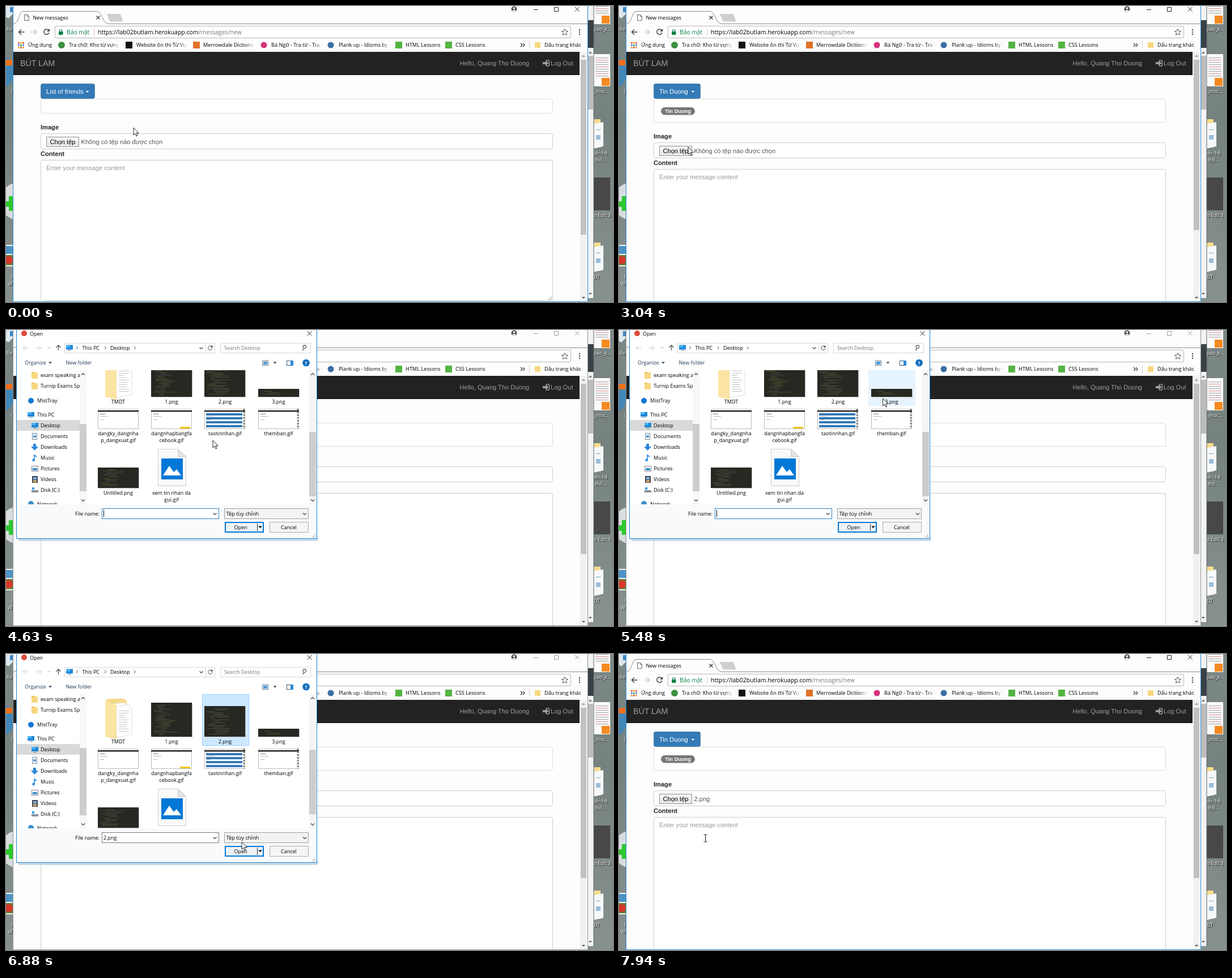
Write an HTML page that moves like this. It is 1071 px wide and 523 px high and loops after 8 s.

```html
<!DOCTYPE html>
<html lang="vi">
<head>
<meta charset="utf-8">
<title>New messages</title>
<style>
html, body { margin: 0; width: 100%; height: 100%; overflow: hidden; background: #fff; }
svg { display: block; }
text { font: 9px "Open Sans", "Noto Sans", sans-serif; fill: #000; }
.page text { font: 11.1px "Liberation Sans", Arial, sans-serif; fill: #333; }
.page .bold { font-weight: bold; fill: #222; }
.mark { font-size: 9.2px; }
.desk { fill: #fff; font-size: 8.6px; text-shadow: 1px 1px 1px #000; }
.mid { text-anchor: middle; }
</style>
</head>
<body>
<svg id="stage" width="1071" height="523" viewBox="0 0 1071 523"></svg>
<script>
const rect = (x, y, w, h, fill, more = '') =>
  `<rect x="${x}" y="${y}" width="${w}" height="${h}" fill="${fill}" ${more}/>`;
const box = (x, y, w, h, fill, line, more = '') =>
  rect(x + .5, y + .5, w - 1, h - 1, fill, `stroke="${line}" ${more}`);
const text = (x, y, s, more = '') => `<text x="${x}" y="${y}" ${more}>${s}</text>`;
const path = (d, fill, more = '') => `<path d="${d}" fill="${fill}" ${more}/>`;
const line = (d, color, w = 1, more = '') => path(d, 'none', `stroke="${color}" stroke-width="${w}" ${more}`);
const dot = (x, y, r, fill, more = '') => `<circle cx="${x}" cy="${y}" r="${r}" fill="${fill}" ${more}/>`;
const group = (id, s, more = '') => `<g id="${id}" ${more}>${s}</g>`;
// Nested svg: clips to a box but keeps stage coordinates.
const clip = (x, y, w, h, s) =>
  `<svg x="${x}" y="${y}" width="${w}" height="${h}" viewBox="${x} ${y} ${w} ${h}">${s}</svg>`;
const down = (x, y, r, fill) => path(`M${x - r},${y}h${2 * r}l${-r},${r}z`, fill);
const chevron = (x, y, r, dir, color = '#444') => line(`M${x - r},${y - dir * r / 2}l${r},${dir * r}l${r},${-dir * r}`, color, 1.2);

let seed = 7;
const rnd = () => (seed = seed * 16807 % 2147483647) / 2147483647;

function papers(x, y, ink) {
  let s = path(`M${x},${y}l6,-4h28l4,4v54l-38,8z`, '#f5d98a') +
    path(`M${x + 12},${y + 5}l24,-2v56l-24,5z`, '#fff', 'stroke="#ddd" stroke-width=".6"') +
    path(`M${x + 20},${y + 10}l20,-4l7,7v46l-27,6z`, '#fff', 'stroke="#ccc" stroke-width=".6"');
  for (let i = 0; i < 10; i++) s += rect(x + 24, y + 17 + i * 4, 8 + rnd() * 11, 1, ink, 'opacity=".5"');
  return s + path(`M${x},${y}l20,7v61l-20,-5z`, '#fbe4a4');
}

function codeShot(x, y, w, h) {
  const inks = ['#87825f', '#7f8d47', '#a39c60', '#777'];
  let s = rect(x + 1, y + 1, w, h, '#bbb') + rect(x, y, w, h, '#272822');
  for (let v = 4; v < h - 3; v += 2.5) {
    const a = 4 + rnd() * 16;
    s += rect(x + a, y + v, 5 + rnd() * (w - a - 30), .8, inks[rnd() * 4 | 0], 'opacity=".5"');
  }
  return s;
}

function webShot(x, y, kind) {
  let s = box(x, y, 72, 36, '#fff', '#bbb') + rect(x, y, 72, 2, '#ddd') + rect(x, y + 3, 72, 2.5, '#222') +
    rect(x + 4, y + 9, 9, 1, '#777') + rect(x + 4, y + 13, 14, 1, '#bbb') + rect(x + 4, y + 19, 7, 1, '#bbb');
  if (kind === 'rows') for (let i = 0; i < 4; i++) s += rect(x + 3, y + 8 + i * 7, 64, 4, '#337ab7');
  if (kind === 'badge') s += rect(x + 51, y + 32, 18, 3, '#f5c518');
  if (kind === 'rows' || kind === 'edge') s += line(`M${x + 70},${y}v36`, '#7f8a80', 3, 'stroke-dasharray="3 2"');
  return s;
}

const monitor = (x, y) => rect(x, y, 12, 8, '#1e88d8') + rect(x, y, 7, 4, '#4fb4f4') + rect(x + 3, y + 9, 6, 1, '#678');

/* ---- desktop ---- */
function sheet(y, h) {
  let s = rect(1037, y, 29, h, '#fbfbfb');
  for (let v = 6; v < h - 18; v += 4) s += rect(1040, y + v, 23, 1.2, v % 12 < 8 ? '#aaa' : '#d99');
  return s + rect(1051, y + h - 15, 14, 14, '#f58a1f');
}
const label = (x, y, s) => text(x, y, s, 'class="desk"');
const desktop = rect(0, 0, 1071, 523, 'url(#wall)') +
  path('M0,0h12v14l-8,8l-4,-3z', '#dfe8ee') + rect(7, 2, 5, 9, '#3f87c5') + label(1, 44, 'Re') +
  dot(-18, 117, 32, '#4187b8') + rect(0, 95, 11, 10, '#f0701c') +
  dot(22, 345, 33, '#d9dcdf') + path('M0,345h5v-9h7v26h-7v-7h-5z', '#2ec82e') +
  rect(0, 422, 12, 38, '#f4f4f4') + rect(0, 424, 12, 14, '#4d93c4') + rect(0, 440, 12, 18, '#6b7a35') + dot(5, 449, 7, '#d8382b') +
  label(9, 154, '(') + label(9, 482, 'I') + label(3, 494, 'W') +
  sheet(-30, 62) + sheet(85, 57) +
  [200, 418].map(y => rect(1037, y, 12, 50, '#f7dc8d') + path(`M1037,${y + 8}l17,-3v43l-17,4z`, '#f6f8fa') +
    rect(1041, y + 18, 8, 1, '#7aa') + rect(1041, y + 28, 8, 8, '#9bbdd9')).join('') +
  rect(1036, 303, 30, 58, '#484848') +
  label(1037, 44, 'pao_k...') + label(1037, 154, '_moc...') + label(1037, 263, 'iến hệ') +
  label(1039, 275, 'thố...') + label(1037, 373, 'o Edit 3') + label(1037, 482, 'DT') +
  rect(1026, 0, 11, 516, '#f3f3f3') + rect(1026, 25, 11, 49, '#3a4145') + rect(1027, 88, 9, 95, '#bdbdbd') +
  path('M1028,84l3,-4l3,4z', '#777') + down(1031, 507, 3, '#555') + rect(1036.5, 0, 1, 516, '#5c6668');

/* ---- browser ---- */
const mark = (x, s, w, icon) => icon + clip(x, 58, w, 22, text(x, 72.3, s, 'class="mark"')) +
  rect(x + w - 14, 60, 14, 18, 'url(#fade)');
const sq = (x, color) => rect(x, 63, 12, 12, color);
let apps = '';
for (let i = 0; i < 9; i++) {
  const col = i % 3, row = i / 3 | 0;
  apps += rect(21 + col * 4, 64 + row * 4, 2.8, 2.8, ['#e44d3a', '#34a853', '#f3a921', '#4285f4'][(i * 2 + row) % 4]);
}

const browser = rect(12, 0, 1015, 523, '#fdfdfd') +
  line('M13,31.5C24,31 22,9.5 30,9.5H160C171,9.5 169,31 181,31.5H1026', '#8b8b8b') +
  path('M178,14h21q3,0 4,3l3,9q0,1.5 -2,1.5h-18q-3,0 -4,-3z', '#cfcfcf') +
  line('M32.5,15.5h5l3,3v7h-8zM37.5,15.5v3h3', '#666') + text(47.5, 23.8, 'New messages') +
  line('M159.5,17.5l6,6m0,-6l-6,6', '#333', 1.3) +
  dot(896.5, 5.5, 5, '#555') + dot(896.5, 4, 1.8, '#fdfdfd') + path('M893,8.5q3.5,-3 7,0q-3.5,3 -7,0z', '#fdfdfd') +
  group('controls', line('M931,6.5h8M967.5,2.5h7v7h-7zM1004,2l7.5,7.5m0,-7.5l-7.5,7.5', 'currentColor')) +
  line('M32.5,46h-10m4.5,-4.5l-4.5,4.5l4.5,4.5', '#444', 1.5) +
  line('M44,46h10m-4.5,-4.5l4.5,4.5l-4.5,4.5', '#ccc', 1.5) +
  line('M75,42.5a4.7,4.7 0 1 0 1,4.5', '#444', 1.5) + path('M77,40v5h-5z', '#444') +
  box(86, 35, 911, 22, '#fff', '#b5b5b5', 'rx="2"') +
  rect(93, 45, 7.5, 6, '#0b8043', 'rx="1"') + line('M94.7,45v-1.5a2,2 0 0 1 4,0v1.5', '#0b8043', 1.2) +
  text(107, 49.8, 'Bảo mật', 'style="font-size:10.3px;fill:#0b8043"') + rect(155, 40, 1, 12, '#ccc') +
  text(162, 49.8, 'https://lab02butlam.herokuapp.com<tspan fill="#777">/messages/new</tspan>', 'style="font-size:10.5px"') +
  path('M986,40.5l1.6,3.8l4,.3l-3.1,2.7l1,4l-3.5,-2.2l-3.5,2.2l1,-4l-3.1,-2.7l4,-.3z', 'none', 'stroke="#555"') +
  [42, 46, 50].map(y => dot(1012, y, 1.2, '#444')).join('') +
  apps + text(39, 72.3, 'Ứng dụng', 'class="mark"') +
  mark(111, 'Tra chữ: Kho từ vựng số hóa', 89, dot(98, 69, 6, '#3d9140')) +
  mark(230, 'Website ôn thi Từ Vựng', 90, sq(211, '#111')) +
  mark(348, 'Merrowdale Dictionary', 90, sq(330, '#e0712a')) +
  mark(468, 'Bá Ngữ - Tra từ - Tra từ', 90, dot(455, 69, 5.5, '#d8337c')) +
  mark(587, 'Plank up - Idioms by verbs', 90, dot(573, 69, 5.5, '#3b6ea5')) +
  mark(705, 'HTML Lessons', 76, sq(687, '#54b443')) +
  mark(793, 'CSS Lessons', 76, sq(775, '#54b443')) +
  line('M908,66l3,3l-3,3m4,-6l3,3l-3,3', '#333', 1.2) + rect(923, 62, 1, 14, '#ccc') +
  rect(933, 64, 10, 10, '#f7d77e', 'rx="1"') + text(950, 72.3, 'Dấu trang khác', 'class="mark"');

const button = (id, w, s) => group(id,
  rect(61.5, 137.5, w - 1, 26, 'currentColor', 'rx="3" stroke="#245580" stroke-opacity=".5"') +
  text(71, 155, s, 'style="fill:#fff"') + down(61 + w - 13.5, 150, 3, '#fff'));
const friends = ['Mien Tho', 'Tin Duong', 'Tuan Manh', 'Thu Quynh'];

const page = rect(13, 81, 999, 40, '#222') + rect(13, 121, 999, 1, '#101010') +
  text(25, 105.5, 'BÚT LAM', 'style="font-size:14.2px;fill:#9d9d9d"') +
  text(923, 105, 'Hello, Quang Tho Duong', 'style="fill:#9d9d9d;text-anchor:end"') +
  path('M947,99h5v-3l5.5,5l-5.5,5v-3h-5z', '#9d9d9d') + line('M953,96h3.5q2,0 2,2v6q0,2 -2,2h-3.5', '#9d9d9d', 1.5) +
  text(961, 105, 'Log Out', 'style="fill:#9d9d9d"') +
  button('pick', 96, 'List of friends') + button('chosen', 83, friends[1]) +
  '<rect id="tags" x="61.5" y="164.5" width="903" rx="3" fill="#fff" stroke="#ddd"/>' +
  group('tag', rect(74, 179, 60, 13.5, '#777', 'rx="6.7"') +
    text(104, 189, friends[1], 'class="mid" style="font-size:9.4px;font-weight:bold;fill:#fff"')) +
  group('form',
    text(61, 217.5, 'Image', 'class="bold"') + box(61, 225, 904, 28, '#fff', '#ccc', 'rx="3"') +
    box(71, 231, 58, 18, '#e9e9e9', '#8f8f8f') + rect(72, 232, 56, 8, '#f3f3f3') +
    text(100, 244, 'Chọn tệp', 'class="mid" style="fill:#000"') +
    '<text id="upload" x="132.5" y="244" style="fill:#555"></text>' +
    text(61, 264.5, 'Content', 'class="bold"') + box(61, 272, 904, 249, '#fff', '#ccc', 'rx="3"') +
    text(71, 290, 'Enter your message content', 'style="fill:#999"') +
    line('M957,519.5l6,-6m-2.5,6l2.5,-2.5', '#888')) +
  rect(1013, 81, 12, 441, '#f1f1f1') + '<rect id="thumb" x="1014" y="95" width="10" fill="#c1c1c1"/>' +
  path('M1016,90l3,-4l3,4z', '#a3a3a3') + down(1019, 514, 3, '#505050') +
  group('menu', rect(61, 168, 128, 93, '#000', 'opacity=".1" rx="4"') + box(61, 166, 127, 92, '#fff', '#bbb', 'rx="3"') +
    '<rect id="hover" x="62" y="191" width="125" height="21" fill="#f5f5f5"/>' +
    friends.map((f, i) => text(77, 185 + i * 20.6, f)).join(''));

/* ---- file dialog ---- */
const side = (y, s, icon, x = 61) => icon + text(x, y + 3.3, s);
const folder = y => rect(45, y - 5, 11, 11, '#f7d77e') + rect(45, y - 6, 5, 2, '#e9be55');
const sidebar = clip(19, 71, 111, 237,
  rect(19, 159, 111, 19, '#d9d9d9') +
  side(80, 'exam speaking a', folder(80)) + side(99, 'Turnip Exams Sp', folder(99)) +
  side(125, 'MistTray', dot(44, 125, 5, '#1277d3'), 55) + side(150, 'This PC', monitor(38, 145), 55) +
  side(169, 'Desktop', monitor(45, 164)) +
  side(188, 'Documents', box(46, 182, 9, 12, '#fff', '#789') + rect(48, 186, 5, 4, '#5b9bd5')) +
  side(207, 'Downloads', path('M48,201h5v5h4l-6.5,7l-6.5,-7h4z', '#2b88d9')) +
  side(226, 'Music', line('M50,230v-9l4,3', '#1e88e5', 1.6) + dot(48.5, 230, 2.2, '#1e88e5')) +
  side(245, 'Pictures', box(45, 240, 12, 10, '#fff', '#889') + rect(47, 244, 8, 4, '#3c8ec7')) +
  side(264, 'Videos', rect(46, 258, 10, 12, '#445') + rect(48, 260, 6, 4, '#7fb2e5') + rect(48, 265, 6, 4, '#c9a86a')) +
  side(283, 'Disk (C:)', rect(45, 283, 12, 4, '#8a9199') + rect(46, 278, 4, 4, '#2b9fe6')) +
  side(307.5, 'Network', dot(44, 307, 5, '#3d8fc9'), 55) +
  group('twigs', line('M26.5,148l2.5,3l2.5,-3M34,242l3,3l-3,3', '#888')));

const cap = (x, y, ...rows) => rows.map((r, i) => text(x, y + 3.3 + i * 12, r, 'class="mid"')).join('');
const tile = (id, x) => `<rect id="${id}" x="${x + .5}" y="71.5" width="82" height="90" fill="#e5f3ff" stroke="#e5f3ff"/>`;
const topRows =
  papers(175, 86, '#666') + path('M181,91l14,-4l3,20l6,14l-4,26l-12,-4z', '#3b3230') + rect(187, 118, 9, 18, '#8a4a33') + cap(198, 160, 'Biểu diễn thông', 'tin') +
  dot(293, 116, 33, 'url(#sea)') + path('M288,88q18,-6 28,8l-6,14l-14,-4l-8,6zM272,122l20,4l-2,16l-10,-3zM308,118l14,-4l-6,20z', '#bcd8e4') +
  path('M254,94h16v-14l19,19l-19,18v-13h-16z', '#e8651c') + cap(292, 160, 'English') +
  path('M399,88l4,18l19,-3l-16,16l10,24l-21,-12l-24,14l8,-23l-14,-18l22,2z', '#36a3f0', 'stroke="#6fbff7"') + cap(386, 160, 'Games') +
  dot(481, 115, 33.5, '#d4d7db', 'stroke="#bbb"') + path('M481,115l-22,-25a33,33 0 0 1 24,-8zM481,115l20,26a33,33 0 0 1 -20,7z', '#f0f2f4') +
  dot(481, 115, 9, '#fff', 'stroke="#aaa"') + path('M453,119h11v11h12v11h-12v12h-11v-12h-11v-11h11z', '#2fc82f') +
  dot(497, 116, 6, '#1e88e5') + path('M499,78h4q2,12 13,16q2,8 -3,14q-1,-10 -10,-13v21h-4z', '#1e88e5') + cap(481, 160, 'Music') +
  papers(175, 194, '#48a') + rect(199, 220, 14, 16, '#8fb8dd') + cap(197, 264, 'Phát triển hệ', 'thống thông tin', 'hiện đại') +
  rect(259, 194, 33, 24, '#7fb9e4') + rect(259, 209, 33, 9, '#2d6f94') + rect(293, 194, 32, 24, '#b9d36a') +
  path('M297,215l8,-18l9,18z', '#d59a2f') + dot(317, 209, 6, '#3f8fcf') + rect(259, 220, 33, 25, '#7d6a2c') + dot(275, 232, 12, '#d9261c') + dot(274, 232, 4, '#f2c12e') +
  rect(293, 220, 32, 25, '#2b87c9') + path('M301,228q8,-12 16,0l-6,12h-4z', '#e0a21b') + cap(292, 264, 'Photos,', 'Wallpapers') +
  path('M370,190l49,12v38l-49,-10z', '#333') + path('M372,193l45,11v33l-45,-9z', '#2b97e8') + path('M372,193l45,11l-45,20z', '#61b8f5') +
  path('M393,236l14,3l4,8l-18,-4z', '#8a8f94') + path('M356,240l12,-6l32,10l-14,8z', '#c9ced2', 'stroke="#888" stroke-width=".6"') + cap(386, 264, 'Softwares') +
  path('M478,189l29,27h-15q0,22 18,34q-37,-3 -41,-34h-17z', '#2fc82f') + cap(481, 264, 'Studying');

const lastRows = tile('tile2', 346) + tile('tile3', 440) +
  papers(175, 83, '#888') + cap(198, 155, 'TMDT') +
  codeShot(256, 86, 72, 60) + cap(292, 155, '1.png') + codeShot(350, 92, 72, 54) + cap(386.5, 155, '2.png') +
  codeShot(445, 132, 72, 14) + cap(481, 155, '3.png') +
  webShot(162, 167) + cap(198, 211, 'dangky_dangnha', 'p_dangxuat.gif') +
  webShot(256, 167, 'badge') + cap(292, 211, 'dangnhapbangfa', 'cebook.gif') +
  webShot(350, 167, 'rows') + cap(386.5, 211, 'taotinnhan.gif') +
  webShot(445, 167, 'edge') + cap(481, 211, 'themban.gif') +
  codeShot(162, 271, 72, 36) + cap(198, 316, 'Untitled.png') +
  path('M268.5,238.5h35l14,13v52h-49z', '#fafafa', 'stroke="#ccc"') + path('M303.5,238.5v13h14z', '#e4e4e4', 'stroke="#ccc"') +
  rect(274, 255, 38, 37, '#0078d7') + path('M277,285l11,-17l8,11l5,-5l8,11z', '#fff') + cap(292, 316, 'xem tin nhan da', 'gui.gif');

const ink = 'style="fill:#1e395b"';
const dialog = rect(21, 365, 530, 8, '#bfd2de', 'rx="4" opacity=".8"') + box(18, -2, 531, 371, '#fff', 'currentColor') +
  rect(19, 308, 529, 60, '#f9fafb') +
  dot(32, 6, 5, '#dd4b39') + text(42, 9.5, 'Open') + line('M531.5,2l8,8m0,-8l-8,8', '#222') +
  group('bars', line('M39,31.5h-9m4,-4l-4,4l4,4M53,31.5h9m-4,-4l4,4l-4,4', '#c8c8c8') + chevron(76, 31, 2.5, 1, '#ccc') +
    box(103, 23, 266, 18, 'none', '#d9d9d9') + rect(352, 23, 1, 18, '#d9d9d9') + box(378, 23, 160, 18, 'none', '#d9d9d9') +
    line('M226,29l2.5,2.5l-2.5,2.5', '#444')) +
  line('M92.5,36v-9m-4,4l4,-4l4,4', '#555', 1.3) + monitor(106, 26.5) +
  line('M124,29l2.5,2.5l-2.5,2.5M174,29l2.5,2.5l-2.5,2.5', '#444') + text(134.5, 34.5, 'This PC') + text(184, 34.5, 'Desktop') +
  chevron(344.5, 32, 3, 1) + line('M363,29a3.7,3.7 0 1 0 1,3.5', '#444') + path('M364.5,27v4h-4z', '#444') +
  text(385, 34.8, 'Search Desktop', 'style="fill:#777;font-size:8.8px"') + line('M523,36l3,-3m.5,-.5a2.8,2.8 0 1 1 3,-3a2.8,2.8 0 0 1 -3,3', '#555', 1.2) +
  text(33, 61.3, 'Organize', ink) + down(78, 56.5, 3, '#1e395b') + text(105.5, 61.3, 'New folder', ink) +
  box(452, 54, 11, 9, '#fff', '#678') + rect(454, 56, 7, 5, '#4f9bd8') + down(474.5, 56.5, 3, '#333') +
  box(495, 54, 12, 9, '#fff', '#357') + rect(502, 54, 5, 9, '#2b88d9') +
  dot(529.5, 58, 6.3, '#0f6cbd') + text(529.5, 61.5, '?', 'class="mid" style="fill:#fff;font-weight:bold"') +
  sidebar + rect(130, 71, 12, 237, '#f7f7f7') + rect(130, 166, 12, 119, '#cdcdcd') + chevron(136, 78, 3, -1) + chevron(136, 301, 3, 1) +
  clip(150, 71, 385, 237, group('list', topRows + group('last', lastRows, 'transform="translate(0 224)"'))) +
  rect(535, 71, 12, 237, '#f5f5f5') + '<rect id="bar" x="535" width="12" fill="#cdcdcd"/>' + chevron(541, 78, 3, -1) + chevron(541, 301, 3, 1) +
  text(165, 327.8, 'File name:', 'text-anchor="end"') +
  '<rect id="field" x="169.5" y="315.5" width="206" height="18" fill="#fff"/><text id="name" x="172" y="328"></text>' +
  '<rect id="caret" x="172" y="318" width="1" height="12"/>' + chevron(368.5, 325, 3, 1) +
  box(385, 315, 149, 19, '#f3f3f3', '#a0a0a0') + text(388.5, 327.8, 'Tệp tùy chỉnh', 'style="font-size:9.3px"') + chevron(527, 325, 3, 1) +
  rect(387, 340, 67, 17, '#eef2f5', 'stroke="#0078d7" stroke-width="2"') + rect(443, 342, 1, 13, '#333') + down(448.5, 346.5, 3.5, '#111') +
  text(414, 351.5, 'Open', 'class="mid"') + box(465, 339, 69, 19, '#f5f5f5', '#adadad') + text(499, 351.5, 'Cancel', 'class="mid"') +
  line('M540,366.5l6,-6m-3,6l3,-3', '#aaa', 1.2, 'stroke-dasharray="1.5 1"');

const defs = `<defs>
<linearGradient id="wall" x2="0" y2="1"><stop stop-color="#7c8886"/><stop offset=".4" stop-color="#76827f"/>
<stop offset="1" stop-color="#87928f"/></linearGradient>
<linearGradient id="fade"><stop stop-color="#fdfdfd" stop-opacity="0"/><stop offset="1" stop-color="#fdfdfd"/></linearGradient>
<radialGradient id="sea" cx=".4" cy=".35"><stop stop-color="#8cc4e6"/><stop offset="1" stop-color="#3579b3"/></radialGradient></defs>`;

document.getElementById('stage').innerHTML = defs + desktop + browser + `<g class="page">${page}</g>` +
  group('frame', line('M12.5,0V522.5H1026.5V0', 'currentColor')) + group('dialog', dialog) +
  group('arrow', path('M0,0V13L3,10.3L5.2,15L7.2,14.1L5,9.5H9.2Z', '#fff', 'stroke="#111" stroke-width=".9"')) +
  group('beam', line('M-3,-6.5h2q1,0 1,1q0,-1 1,-1h2M0,-5.5v11M-3,6.5h2q1,0 1,-1q0,1 1,1h2', '#111'));

/* ---- motion ---- */
const $ = id => document.getElementById(id);
const set = (id, k, v) => $(id).setAttribute(k, v);
const show = (id, on) => set(id, 'display', on ? 'inline' : 'none');

// Screen updates come in bursts: start, end, count.
const bursts = [[120, 730, 5], [1000, 1550, 5], [1830, 2760, 8], [2890, 3830, 7],
  [3980, 4900, 8], [5060, 6050, 8], [6180, 7130, 8], [7280, 7940, 6]];
const ticks = bursts.flatMap(([a, b, n]) => Array.from({ length: n }, (_, i) => a + (b - a) * i / (n - 1)));
const snap = t => ticks.reduce((last, u) => u <= t ? u : last, 0);

// Pointer stops: time, x, y.
const route = [[0, 225, 215], [425, 121, 150], [870, 121, 150], [1500, 121, 197], [1960, 121, 197], [2700, 122, 249],
  [3980, 122, 249], [4300, 365, 195], [4930, 365, 195], [5450, 478, 112], [5760, 383, 117], [6316, 383, 117],
  [6850, 416, 332], [7100, 418, 346], [7290, 418, 346], [7800, 152.5, 325.5]];

function pointer(t) {
  const i = route.findIndex(k => k[0] > t);
  if (i < 0) return route[route.length - 1].slice(1);
  const [a, b] = [route[i - 1], route[i]];
  const u = (t - a[0]) / (b[0] - a[0]), e = u * u * (3 - 2 * u);
  return [a[1] + (b[1] - a[1]) * e, a[2] + (b[2] - a[2]) * e];
}

function draw(time) {
  const t = snap(time), within = (a, b) => t >= a && t < b;
  const [x, y] = pointer(t);
  const picked = t >= 1950, idle = within(3200, 7400), beam = t >= 7500;

  show('pick', !picked);
  show('chosen', picked);
  show('tag', picked);
  show('menu', within(570, 1950));
  show('hover', y > 185);
  set('pick', 'color', t >= 420 ? '#286090' : '#337ab7');
  set('chosen', 'color', '#337ab7');
  set('tags', 'height', picked ? 41 : 25);
  set('form', 'transform', `translate(0 ${picked ? 16 : 0})`);
  set('thumb', 'height', picked ? 301 : 309);
  $('upload').textContent = t >= 7400 ? '2.png' : 'Không có tệp nào được chọn';
  set('controls', 'color', idle ? '#999' : '#222');
  set('frame', 'color', idle ? '#8f9698' : '#2a8ad4');

  const ready = t >= 3670, k = ready ? 1 : t >= 3500 ? .9965 : .96;
  show('dialog', within(3350, 7400));
  set('dialog', 'opacity', t < 3500 ? .5 : 1);
  set('dialog', 'color', ready ? '#1883d7' : '#7d9bb0');
  set('dialog', 'transform', `translate(${283.5 * (1 - k)} ${184 * (1 - k)}) scale(${k})`);
  show('bars', ready);
  show('twigs', t < 4200);

  const scroll = t >= 6400 ? 224 : 252 * Math.min(1, Math.max(0, (t - 4111) / 394));
  set('list', 'transform', `translate(0 ${-scroll})`);
  set('bar', 'y', 84 + 96 * scroll / 252);
  set('bar', 'height', ready ? 114 : 89);

  const chosen = t >= 5880;
  show('tile2', t >= 5600);
  show('tile3', within(5300, 5600));
  set('tile2', 'fill', chosen ? '#cce8ff' : '#e5f3ff');
  set('tile2', 'stroke', chosen ? '#99d1ff' : '#e5f3ff');
  show('caret', !chosen);
  $('name').textContent = chosen ? '2.png' : '';
  set('field', 'stroke', chosen ? '#7a7a7a' : '#2f80c2');

  show('arrow', !beam);
  show('beam', beam);
  set(beam ? 'beam' : 'arrow', 'transform', `translate(${x} ${y})`);
}

const start = performance.now();
function loop(now) {
  draw(Math.max(0, now - start) % 8000);
  requestAnimationFrame(loop);
}
draw(0);
requestAnimationFrame(loop);
</script>
</body>
</html>
```
